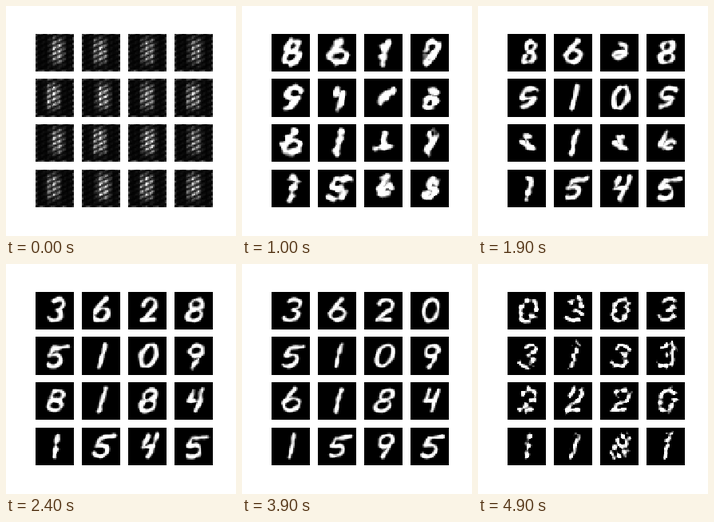
A matplotlib script for the animation above (5.1 s loop, 288 by 288 pixels).

```python
import numpy as np
import matplotlib.pyplot as plt
from matplotlib.animation import FuncAnimation

SIZE, SAMPLES, FRAMES = 28, 80, 51
LAST = 49                              # hard cut to the closing picture
# which digit each cell resembles (row by row) from a given frame on
STAGES = {6: "8662 5498 6130 1568",
          14: "8608 9105 6166 7545",
          24: "3628 5109 8184 1545",
          32: "3628 5109 6194 1548",
          39: "3620 5109 6184 1595"}
FINAL = "0303 3133 2220 1181"

yy, xx = np.mgrid[0:SIZE, 0:SIZE].astype(float)


def arc(cx, cy, rx, ry, start=0, stop=360):
    """Elliptic arc, angles in degrees, clockwise on screen."""
    a = np.radians(np.linspace(start, stop, 40))
    return np.c_[cx + rx * np.cos(a), cy + ry * np.sin(a)]


def line(*points):
    return np.array(points, float)


# skeletons in a box from -1 to 1, y pointing down
DIGITS = {
    "0": [arc(0, 0, 1, 0.95, -60, 300)],
    "1": [line((0, -1), (0, 1))],
    "2": [np.vstack([arc(0, -0.4, 0.85, 0.55, -170, 50), line((-0.8, 0.9), (0.9, 0.85))])],
    "3": [np.vstack([arc(0, -0.5, 0.8, 0.45, -150, 80), arc(0, 0.45, 0.95, 0.5, -80, 150)])],
    "4": [line((-0.5, -0.9), (-0.7, 0.1), (0.7, 0)), line((0.8, -1), (0.3, 1))],
    "5": [np.vstack([line((1.2, -0.85), (-0.6, -0.65), (-0.8, 0)),
                     arc(-0.1, 0.45, 0.9, 0.5, -80, 140)])],
    "6": [np.vstack([line((0.1, -1), (-0.7, -0.2)), arc(0, 0.35, 1, 0.55, 190, -170)])],
    "7": [line((-0.8, -0.9), (0.8, -0.9), (0, 1))],
    "8": [arc(0, -0.45, 0.75, 0.45, 90, 450), arc(0, 0.45, 0.9, 0.48, -90, 270)],
    "9": [np.vstack([arc(0, -0.4, 0.8, 0.5, 0, -360), line((0.5, 0.4), (0, 1))])],
}


def sample(digit):
    """Evenly spaced points along all strokes of a digit."""
    dense = []
    for p in DIGITS[digit]:
        s = np.r_[0, np.cumsum(np.hypot(*np.diff(p, axis=0).T))]
        t = np.linspace(0, s[-1], int(s[-1] * 60))
        dense.append(np.c_[np.interp(t, s, p[:, 0]), np.interp(t, s, p[:, 1])])
    dense = np.vstack(dense)
    return dense[np.linspace(0, len(dense) - 1, SAMPLES).astype(int)]


def place(digit, cell):
    """Digit outline in raster units, with the slant of its cell."""
    slant = np.random.default_rng(cell).uniform(0.15, 0.3)
    x, y = sample(digit).T
    y = 8.2 * y
    return np.c_[14.5 + 5.4 * x - slant * y, 13.3 + y]


def centre(cell):
    return 13.8 + 1.5 * np.cos(2.4 * cell)


def poses_of(cell):
    column = [text.replace(" ", "")[cell] for text in STAGES.values()]
    u = np.linspace(-1, 1, SAMPLES)
    start = np.c_[centre(cell) - u, 13 + 8 * u]
    return [start] + [place(digit, cell) for digit in column]


KEYS = [0, *STAGES]
CELLS = [poses_of(cell) for cell in range(16)]
CLOSING = [place(digit, cell) for cell, digit in enumerate(FINAL.replace(" ", ""))]


def blotches(seed, shift=0.0, period=7):
    """Smooth uneven field made of a few random waves."""
    rng = np.random.default_rng(seed)
    field = np.zeros_like(xx)
    for angle, phase in rng.uniform(0, 2 * np.pi, (5, 2)):
        k = 2 * np.pi / (period * rng.uniform(0.8, 1.4))
        field += np.sin(k * (xx * np.cos(angle) + yy * np.sin(angle)) + phase + shift)
    return field / 2


def ink(points, radius, soft, rough):
    """White strokes with soft edges on a 28 x 28 raster."""
    dist = np.hypot(xx[..., None] - points[:, 0], yy[..., None] - points[:, 1])
    return np.clip(0.5 - ((dist - radius).min(-1) + rough) / soft, 0, 1)


def woven(cell):
    """Dim dashed texture that the untrained network gives."""
    rng = np.random.default_rng(cell)
    dashes = 0.5 + 0.5 * np.sin(np.pi / 2 * (yy + 0.5 * xx))
    columns = 0.65 + 0.35 * np.sin(np.pi / 2 * xx)
    glow = np.exp(-((xx - centre(cell)) / 5) ** 4 - ((yy - 12.5) / 9.5) ** 4)
    edge = np.minimum.reduce([xx, yy, SIZE - 1 - xx, SIZE - 1 - yy]) == 0
    level = rng.uniform(0.6, 0.85)
    light = (0.06 + level * glow) * (0.2 + dashes * columns) + 0.25 * edge * dashes
    return np.clip(light * rng.uniform(0.7, 1.2, xx.shape), 0, 1)


def picture(cell, frame):
    if frame == 0:
        return woven(cell)
    if frame >= LAST:
        gaps = 0.9 * blotches(100 + cell, period=5) + 0.3
        return ink(CLOSING[cell], 1.5, 1.1, gaps)

    poses = CELLS[cell]
    k = max(n for n, key in enumerate(KEYS) if key <= frame)
    nxt = min(k + 1, len(KEYS) - 1)
    end = KEYS[nxt] if nxt > k else LAST
    t = (frame - KEYS[k]) / (end - KEYS[k])

    # each epoch wobbles a little; strokes get thinner and cleaner with training
    phase = np.random.default_rng(1000 * frame + cell).uniform(0, 2 * np.pi, 2)
    u = np.linspace(0, 2 * np.pi, SAMPLES)
    points = (1 - t) * poses[k] + t * poses[nxt] + 0.35 * np.sin(u[:, None] + phase)
    radius = (1.3 + 2.4 * np.exp(-frame / 9)) * (1 + 0.2 * np.sin(2 * u + cell))
    rough = (0.25 + 1.5 * np.exp(-frame / 10)) * blotches(cell, 0.25 * frame)
    image = ink(points, radius, 1.3 + np.exp(-frame / 8), rough)
    if frame < 4:
        image = (frame * image + (4 - frame) * woven(cell)) / 4
    return image


fig, axes = plt.subplots(4, 4, figsize=(4, 4), dpi=72, facecolor="white")
fig.subplots_adjust(left=0.125, right=0.9, bottom=0.125, top=0.88,
                    wspace=0.2, hspace=0.2)
images = []
for n, ax in enumerate(axes.flat):
    ax.axis("off")
    images.append(ax.imshow(picture(n, 0), cmap="gray", vmin=0, vmax=1,
                            interpolation="nearest"))


def update(frame):
    for n, image in enumerate(images):
        image.set_data(picture(n, frame))
    return images


anim = FuncAnimation(fig, update, frames=FRAMES, interval=100, repeat=True,
                     repeat_delay=0, blit=False)
plt.show()
```
